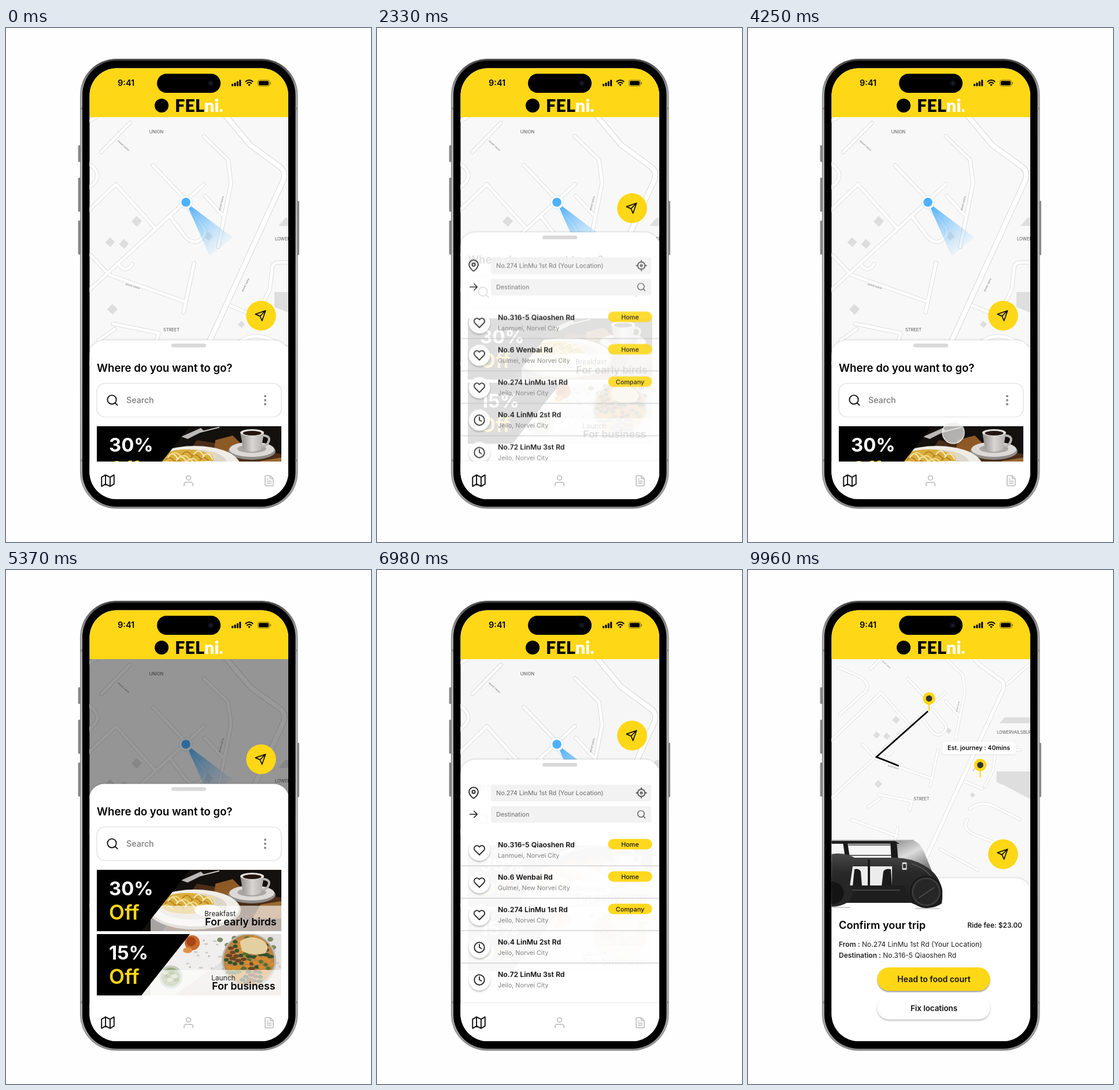
Animation of 631 by 888 pixels, one loop 10 s. Source, as an HTML page:

```html
<!DOCTYPE html>
<html lang="en">
<head>
<meta charset="utf-8">
<title>Ride app</title>
<style>
html, body { margin: 0; width: 100%; height: 100%; overflow: hidden; background: #fefefe; }
svg { display: block; width: 631px; height: 888px; font-family: Inter, "Open Sans", sans-serif; }
.soft { filter: drop-shadow(0 2px 1.5px #0004); }
.deep { filter: drop-shadow(0 2.5px 1.2px #0006); }
.faint { filter: drop-shadow(0 1px 2px #0001); }
.edge { filter: drop-shadow(0 -1px 1.5px #0002); }
.line { fill: none; stroke-linecap: round; stroke-linejoin: round; }
</style>
</head>
<body>
<svg id="stage" viewBox="0 0 631 888"></svg>
<script>
const YELLOW = '#fed716', LOOP = 10000;

const text = (x, y, size, str, weight = 400, fill = '#000', anchor = 'start') =>
  `<text x="${x}" y="${y}" font-size="${size}" font-weight="${weight}" fill="${fill}" text-anchor="${anchor}">${str}</text>`;
const box = (x, y, w, h, r, fill, extra = '') =>
  `<rect x="${x}" y="${y}" width="${w}" height="${h}" rx="${r}" fill="${fill}" ${extra}/>`;
const dot = (x, y, r, fill, extra = '') => `<circle cx="${x}" cy="${y}" r="${r}" fill="${fill}" ${extra}/>`;
const oval = (x, y, rx, ry, fill) => `<ellipse cx="${x}" cy="${y}" rx="${rx}" ry="${ry}" fill="${fill}"/>`;
const shape = (d, fill, extra = '') => `<path d="${d}" fill="${fill}" ${extra}/>`;
const line = (d, color, width) => `<path class="line" d="${d}" stroke="${color}" stroke-width="${width}"/>`;
const repeat = (n, make) => Array.from({ length: n }, (_, i) => make(i)).join('');

const ICONS = {
  map: 'M1 6v16l7-4 8 4 7-4V2l-7 4-8-4-7 4zM8 2v16M16 6v16',
  user: 'M20 21v-2a4 4 0 0 0-4-4H8a4 4 0 0 0-4 4v2M12 3a4 4 0 1 1 0 8a4 4 0 1 1 0-8',
  file: 'M14 2H6a2 2 0 0 0-2 2v16a2 2 0 0 0 2 2h12a2 2 0 0 0 2-2V8zM14 2v6h6M16 13H8M16 17H8M10 9H8',
  send: 'M22 2L11 13M22 2l-7 20-4-9-9-4z',
  search: 'M11 3a8 8 0 1 1 0 16a8 8 0 1 1 0-16M21 21l-4.3-4.3',
  heart: 'M20.8 4.6a5.5 5.5 0 0 0-7.8 0L12 5.7l-1-1a5.5 5.5 0 0 0-7.8 7.8l1 1L12 21.2l7.8-7.8 1-1a5.5 5.5 0 0 0 0-7.8z',
  clock: 'M12 2a10 10 0 1 1 0 20a10 10 0 1 1 0-20M12 6v6l4 2',
  pin: 'M21 10c0 7-9 13-9 13s-9-6-9-13a9 9 0 0 1 18 0zM12 7a3 3 0 1 1 0 6a3 3 0 1 1 0-6',
  arrow: 'M4 12h16M13 5l7 7-7 7',
  target: 'M12 4a8 8 0 1 1 0 16a8 8 0 1 1 0-16M12 1v4M12 19v4M1 12h4M19 12h4M12 10a2 2 0 1 1 0 4a2 2 0 1 1 0-4'
};
const icon = (name, x, y, size, color = '#111', width = 2) =>
  `<g transform="translate(${x - size / 2} ${y - size / 2}) scale(${size / 24})">${line(ICONS[name], color, width)}</g>`;

function phone() {
  const buttons = [[125, 203, 28], [125, 259, 58], [125, 333, 58], [503, 299, 93]];
  return buttons.map(([x, y, h]) => box(x, y, 3.5, h, 1, '#8a8a8a', 'stroke="#666" stroke-width=".5"')).join('') +
    box(128.5, 53.5, 375.5, 776.5, 62, 'url(#rim)', 'stroke="#6e6e6e" stroke-width=".8"') +
    box(132, 56.5, 368.5, 770.5, 59, '#000') +
    [137, 745].map(y => box(128.5, y, 3.5, 4, 0, '#8a8a8a') + box(500.5, y, 3.5, 4, 0, '#8a8a8a')).join('');
}

function header() {
  const bars = [4, 6, 8.5, 11].map((h, i) => box(390 + i * 4.4, 100.5 - h, 3, h, .8, '#000')).join('');
  const wifi = line('M414.5 92.5a8.5 8.5 0 0 1 12 0M417 95.5a5 5 0 0 1 7 0', '#000', 2.2) +
    shape('M418.2 97.8q2.3-1.6 4.6 0l-2.3 2.6z', '#000');
  return box(144, 69, 345, 85, 0, YELLOW) +
    text(193, 100, 14.5, '9:41', 600) +
    box(261, 79, 110, 33, 16.5, '#000') + dot(354, 95.5, 5, '#0d1018') + dot(354, 95.5, 2, '#1b2136') +
    bars + wifi +
    box(435.5, 90, 20, 10.5, 3, 'none', 'stroke="#0007"') + box(437, 91.5, 17, 7.5, 1.8, '#000') +
    box(456.5, 93.5, 1.5, 4, .7, '#0007') +
    dot(269, 134, 12, '#000') +
    `<text x="292" y="145" font-size="30.5" font-weight="900" style="font-family:Lato,sans-serif">FEL<tspan fill="#fff">ni.</tspan></text>`;
}

function cityMap() {
  const minor = 'M70 521L342 270M254 237L312 298M70 385L190 270L258 346M342 187L384 228L389 268L367 378' +
    'M344 290L377 326M284 326L308 358Q322 376 336 366Q350 354 340 342L314 310' +
    'M165 214L214 164M145 160L156 154M90 210L140 232Q168 250 152 268L92 322' +
    'M180 427L310 473M325 406L307 491M146 392L176 424M196 410Q208 424 218 408' +
    'M185 511L264 527L258 548M160 540L188 520M120 570L230 610M230 590L210 680M520 405H470Q460 406 460 416L456 452L436 492' +
    'M384 478L430 497M400 545Q430 520 470 545L520 570M395 570Q380 590 410 605L500 640M330 640L420 690M488 250L545 200';
  const major = 'M370 140L422 202L474 240Q484 248 480 262L290 676';
  const blocks = [[180, 370, 12], [204, 373, 12], [226, 334, 13], [184, 486, 13], [350, 360, 11], [407, 512, 9], [262, 650, 12]]
    .map(([x, y, s]) => box(x - s / 2, y - s / 2, s, s, 0, '#dedede', `transform="rotate(42 ${x} ${y})"`)).join('');
  const street = [[203, 203, 42], [372, 303, -76], [219, 446, 17], [414, 444, -65]]
    .map(([x, y, a]) => `<g transform="translate(${x} ${y}) rotate(${a})">${text(0, 1.5, 4.6, 'street name', 400, '#777', 'middle')}</g>`).join('');
  return blocks +
    shape('M471 342l12-14h62v14zM464 456h80v66l-60-32-20-8z', '#dedede') +
    line(minor, '#dadada', 7) + line(minor, '#fff', 5.2) +
    line(major, '#d6d6d6', 10) + line(major, '#fff', 8) + street +
    `<g id="labels" fill="#555"><text x="260" y="182" text-anchor="middle">UNION</text>` +
    `<text x="286" y="524" text-anchor="middle">STREET</text><text x="465" y="367">LOWERVAILSBURG</text></g>`;
}

const locator = () =>
  shape('M311 301L392 362L352 394Z', 'url(#beam)') +
  dot(311, 301, 11, '#4db1ff', 'id="halo" fill-opacity=".24" stroke="#4db1ff" stroke-opacity=".45"') +
  dot(311, 301, 11.5, '#fff', 'stroke="#cfe3f3" stroke-width=".8"') + dot(311, 301, 7.8, '#4db1ff');

function breakfast() {
  return box(157, 688, 319, 106, 0, '#14100e') +
    shape('M330 712L476 736V794H270Z', '#4a2d18') + shape('M362 712l30-8 18 18-10 18-40-12z', '#8d5a26') +
    shape('M440 748l36-6v30h-50z', '#9a6a35') +
    shape('M303 706l34-15 5 5-28 14z', '#b9b8b6') + line('M336 698L368 690', '#c9c5bf', 2) +
    oval(425, 731, 41, 15, '#8f8b88') + oval(425, 728, 39, 13, '#dcd9d6') + oval(425, 727, 25, 7, '#aaa6a2') +
    line('M446 704q14 2 6 14q-4 5-10 4', '#bab6b2', 4) +
    shape('M405 699h41l-5 29q-16 8-31 0z', 'url(#cup)') + oval(425.5, 699, 20.5, 6, '#e5e2df') + oval(425.5, 700, 16, 4, '#241510') +
    oval(326, 757, 80, 34, '#b9b1a6') + oval(326, 754, 77, 32, '#f0ede7') + oval(322, 751, 60, 23, '#dcd6ca') +
    oval(312, 746, 47, 18, '#d9ae3c') +
    repeat(16, i => line(`M${270 + i * 5} ${752 - i % 4 * 5}q8-${8 + i % 3 * 3} 17 3`, ['#f3dc8c', '#b98222', '#f7ecc4'][i % 3], 2)) +
    oval(350, 758, 24, 10, '#faf8f4');
}

function lunch() {
  const tones = ['#55702f', '#d98a2b', '#6d4422', '#e8c987', '#35522c', '#b8552b', '#a3682f'];
  const bits = repeat(80, i => {
    const a = i * 2.4, r = Math.sqrt(i / 80) * 41;
    return oval(420 + Math.cos(a) * r, 844 + Math.sin(a) * r, 4 + i % 3, 3, tones[i * i % 7]);
  });
  const crumbs = repeat(40, i => oval(300 + i * 47 % 174, 802 + i * 29 % 68, 1.5 + i % 3, 1.5, i % 3 ? '#cbc9c6' : '#a9b09a'));
  return box(157, 799, 319, 106, 0, '#e2e1df') + shape('M310 799h90l-30 50-80 56h-60z', '#f0efee') + crumbs +
    dot(322, 814, 13, '#c96a2d') + dot(320, 812, 8, '#a84516') + oval(314, 827, 8, 5, '#e0904a') +
    [[370, 809], [395, 806], [383, 818], [457, 808], [462, 822]].map(([x, y]) => oval(x, y, 5, 4, '#7d8b68')).join('') +
    dot(420, 845, 47, '#bdbab4') + dot(420, 844, 44, '#b98648') + bits +
    shape('M404 812q18-14 40-2q14 10 4 22q-22 6-40-4z', '#e3cfa0') +
    dot(285, 873, 20, '#c9cbc2') + dot(285, 873, 16, '#98a97a') +
    repeat(6, i => oval(275 + i * 4, 866 + i % 3 * 6, 5, 3.5, i % 2 ? '#6f8a4a' : '#c3cda9'));
}

function promo(y, photo, percent, kind, pitch, x) {
  return `<g clip-path="url(#card${y})">${photo}` +
    box(250, y + 62, 227, 44, 0, '#fff', 'fill-opacity=".62"') +
    shape(`M157 ${y}H318L234 ${y + 106}H157Z`, '#000') +
    text(178, y + 44, 32.8, percent, 700, '#fff') + text(178, y + 86, 35, 'Off', 600, YELLOW) +
    text(x, y + 80, 12, kind, 400, '#222') + text(x + 1, y + 96, 17.8, pitch, 600) + '</g>';
}

const homePanel = () =>
  text(157, 594, 18.65, 'Where do you want to go?', 600) +
  box(157, 614, 319, 58, 14, '#fff', 'stroke="#dcdcdc" stroke-width="1.2"') +
  icon('search', 184, 643, 23) + text(208, 648, 14.2, 'Search', 500, '#7c7c7c') +
  [636, 643, 650].map(y => dot(448, y, 2.1, '#8b8b8b')).join('') +
  promo(688, breakfast(), '30%', 'Breakfast', 'For early birds', 343) +
  promo(799, lunch(), '15%', 'Launch', 'For business', 355);

const HERE = 'No.274 LinMu 1st Rd', THERE = 'No.316-5 Qiaoshen Rd';
const PLACES = [
  [THERE, 'Lanmuei, Norvei City', 'Home'],
  ['No.6 Wenbai Rd', 'Gulmei, New Norvei City', 'Home'],
  [HERE, 'Jeilo, Norvei City', 'Company'],
  ['No.4 LinMu 2st Rd', 'Jeilo, Norvei City'],
  ['No.72 LinMu 3st Rd', 'Jeilo, Norvei City']
];

function listPanel() {
  const rows = PLACES.map(([name, area, tag], i) => {
    const y = i * 56;
    return dot(177, 483 + y, 18.5, '#fff', 'class="soft"') + icon(tag ? 'heart' : 'clock', 177, 483 + y, 21) +
      text(209, 478 + y, 12.3, name, 600) + text(209, 496 + y, 10.8, area, 400, '#7d7d7d') +
      (tag ? box(399.5, 463.5 + y, 76, 18, 9, YELLOW) + text(437.5, 476.5 + y, 10.8, tag, 500, '#111', 'middle') : '') +
      (i < 4 ? box(144, 509.5 + y, 345, 1, 0, '#bdbdbd') : '');
  }).join('');
  return icon('pin', 167, 384, 21) + icon('arrow', 167, 421, 19) +
    box(197, 370, 277, 28.5, 3, '#f2f2f2') + box(197, 407, 277, 28.5, 3, '#f2f2f2') +
    text(206, 388, 10.8, HERE + ' (Your Location)', 400, '#666') + text(206, 425, 10.8, 'Destination', 400, '#666') +
    icon('target', 457, 384, 19, '#555', 2.4) + icon('search', 457, 421, 17, '#555') + rows;
}

const tripPanel = () =>
  text(157, 620, 18.2, 'Confirm your trip', 600) + text(474, 618, 12, 'Ride fee: $23.00', 500, '#000', 'end') +
  text(157, 651, 12.1, `<tspan font-weight="600">From :</tspan> ${HERE} (Your Location)`, 400, '#222') +
  text(157, 670, 12, `<tspan font-weight="600">Destination :</tspan> ${THERE}`, 400, '#222') +
  box(223.5, 686.5, 195, 40.5, 20.2, YELLOW, 'class="deep"') + text(321.5, 712, 14, 'Head to food court', 600, '#111', 'middle') +
  box(223.5, 736.5, 195, 40, 20, '#fff', 'class="soft"') + text(321.5, 762, 13.3, 'Fix locations', 600, '#111', 'middle');

const car = () =>
  shape('M250 467H282Q296 468 304 486L322 530L255 506Z', 'url(#glass)') +
  shape('M144 471H254V503H144Z', '#f6f6f6') +
  shape('M144 468H254L262 473H144Z', '#222') + line('M146 467H286', '#b4b4b4', 1.8) +
  shape('M164 470h8l4 27h-8zM246 470h11l3 34h-12z', '#191919') + line('M174 475H246M174 493H248', '#333', 1.6) +
  shape('M144 491Q166 487 184 497H254Q296 498 322 524Q340 545 335 576Q322 586 300 583L282 575H144Z', 'url(#body)') +
  shape('M181 512H249V546H176Z', '#ececec') +
  shape('M207 500h4v46h-4zM184 517q8-2 11 4l2 25h-16zM247 517q-10-2-13 4l-3 25h18z', '#1a1a1a') +
  shape('M170 545H270L280 575H166Z', '#1e1e1e') + line('M178 553H262', '#505050', 1.5) +
  box(266.5, 505, 8, 13, 1.5, '#d8d8d8') + box(268, 508, 5, 7, 1, '#333') +
  line('M284 508Q312 516 322 540', '#555', 1.5) +
  shape('M144 531Q176 530 181 556Q180 580 144 582Z', '#262626') + shape('M144 538Q164 540 166 558Q164 576 144 578Z', '#141414') +
  dot(308, 556, 28, '#191919') + dot(308, 556, 25, '#3a3a3a') + dot(308, 556, 22, '#262626') + line('M296 566L321 549', '#4a4a4a', 2) +
  line('M148 583H176M290 585H330', '#0003', 2);

const marker = (x, y) => line(`M${x} ${y}v20.5`, YELLOW, 2) + dot(x, y, 10.7, YELLOW) + dot(x, y, 5.4, '#333');

const tripMap = () =>
  `<path id="route" d="M311 244L222 323L317 361L298 494L362 372L401 358" pathLength="1" fill="none" stroke="#000" stroke-width="2.8"/>` +
  marker(313, 222) + marker(401.5, 337) +
  box(336, 297, 127, 21, 5, '#fff', 'class="faint"') + text(399, 311.3, 10.6, 'Est. journey : 40mins', 600, '#111', 'middle');

const card = y => `<clipPath id="card${y}">${box(157, y, 319, 106, 0, '#000')}</clipPath>`;

document.getElementById('stage').innerHTML = `
<defs>
  <linearGradient id="rim" x2="0" y2="1"><stop stop-color="#3c3c3c"/><stop offset=".07" stop-color="#a8a8a8"/><stop offset=".5" stop-color="#bdbdbd"/><stop offset=".95" stop-color="#a8a8a8"/><stop offset="1" stop-color="#8a8a8a"/></linearGradient>
  <linearGradient id="beam" gradientUnits="userSpaceOnUse" x1="311" y1="301" x2="374" y2="382"><stop stop-color="#3ea8fb"/><stop offset="1" stop-color="#8fcbfb" stop-opacity=".08"/></linearGradient>
  <linearGradient id="cup"><stop stop-color="#8d8986"/><stop offset=".5" stop-color="#d8d5d2"/><stop offset="1" stop-color="#b3afac"/></linearGradient>
  <linearGradient id="glass" x2=".6" y2="1"><stop stop-color="#8c8c8c"/><stop offset=".45" stop-color="#dcdcdc"/><stop offset="1" stop-color="#6a6868"/></linearGradient>
  <linearGradient id="body" x2="0" y2="1"><stop stop-color="#484848"/><stop offset=".35" stop-color="#292929"/><stop offset="1" stop-color="#1c1c1c"/></linearGradient>
  <clipPath id="screen">${box(144.5, 69.5, 343.5, 744.5, 47, '#000')}</clipPath>${card(688)}${card(799)}
</defs>
${phone()}
<g clip-path="url(#screen)">
  ${box(144, 69, 345, 746, 0, '#f8f8f8')}
  <g id="map">${cityMap()}</g>
  <g id="locator">${locator()}</g>
  <g id="tripMap">${tripMap()}</g>
  ${box(144, 153, 345, 662, 0, '#000', 'id="dim"')}
  <g id="fab">${dot(441, 0, 25.8, YELLOW)}${icon('send', 440, 0, 21)}</g>
  <g id="sheet">${box(144, -.5, 345, 620, 26, '#fff', 'class="edge"')}${box(286, 5.2, 60, 6.5, 3.2, '#d9d9d9', 'id="grip"')}</g>
  <g id="home">${homePanel()}</g>
  <g id="list">${listPanel()}</g>
  <g id="tabs">${box(144, 749, 345, 66, 0, '#fff')}${icon('map', 176, 782, 23.5)}${icon('user', 315.5, 782, 23, '#c2c2c2')}${icon('file', 455, 782, 21, '#c2c2c2')}${box(144, 747, 345, 1, 0, '#efefef', 'id="rule"')}</g>
  <g id="trip">${tripPanel()}</g>
  <g id="car">${car()}</g>
  ${header()}
</g>
<g id="cursor">${dot(0, 0, 19, '#fff', 'fill-opacity=".68" stroke="#fff" stroke-opacity=".8" stroke-width="1.5" class="soft"')}</g>`;

const el = {};
document.querySelectorAll('#stage [id]').forEach(n => el[n.id] = n);

const clamp = p => Math.min(1, Math.max(0, p));
const ease = p => 1 - (1 - clamp(p)) ** 3;

// Screen changes: search, back, pull up, search, confirm
const STEPS = [[1970, 720], [3850, 400], [4610, 760], [6340, 900], [7630, 900]];
const track = (t, start, ...goals) => STEPS.reduce((v, [at, span], i) => v + (goals[i] - v) * ease((t - at) / span), start);

// Touches: from, until, travel time, start and end point
const TOUCHES = [
  [580, 1970, 400, 523, 490, 329, 657],
  [2850, 3850, 480, 329, 657, 385, 252],
  [4050, 4490, 200, 355, 680, 355, 699],
  [4490, 4650, 1, 358, 715, 358, 715],
  [5570, 6380, 400, 360, 713, 316, 505]
];

const move = (node, x, y, k = 1) => node.setAttribute('transform', `translate(${x} ${y}) scale(${k})`);
const fade = (node, v) => { node.style.opacity = v; node.style.display = v > .002 ? '' : 'none'; };

function draw(t) {
  const sheet = track(t, 540, 327, 540, 370, 327, 533);
  const list = track(t, 0, 1, 0, 0, 1, 0);
  const trip = track(t, 0, 0, 0, 0, 0, 1);

  move(el.map, 91 * trip, 15 * trip, 1 - .27 * trip);
  el.labels.setAttribute('font-size', 7.4 + 2.4 * trip);
  move(el.fab, 0, track(t, 497, 285, 497, 327, 285, 491));
  move(el.sheet, 0, sheet);
  move(el.home, 0, sheet - 540);
  move(el.list, 0, sheet - 327);
  move(el.trip, 0, sheet - 533);
  move(el.car, -210 * (1 - trip), 0);

  fade(el.dim, track(t, 0, 0, 0, .4, 0, 0));
  fade(el.home, 1 - list - trip);
  fade(el.list, list);
  fade(el.rule, list);
  fade(el.trip, trip);
  fade(el.car, trip);
  fade(el.tripMap, trip);
  [el.locator, el.grip, el.tabs].forEach(n => fade(n, 1 - trip));

  const pulse = clamp((t - 2850) / 1000);
  el.halo.setAttribute('r', 11 + 21.2 * Math.sin(Math.PI * pulse));

  const run = t < 9860 ? t - 8860 : t - 9860;
  const drawn = ease(run / 900);
  el.route.setAttribute('stroke-dasharray', `${drawn} 2`);
  el.route.style.visibility = drawn ? 'visible' : 'hidden';

  const touch = TOUCHES.find(([from, until]) => t >= from && t < until);
  fade(el.cursor, touch ? 1 : 0);
  if (touch) {
    const [from, , span, x0, y0, x1, y1] = touch, p = ease((t - from) / span);
    move(el.cursor, x0 + (x1 - x0) * p, y0 + (y1 - y0) * p);
  }
}

const origin = performance.now();
function frame() {
  draw((performance.now() - origin) % LOOP);
  requestAnimationFrame(frame);
}
frame();
</script>
</body>
</html>
```
